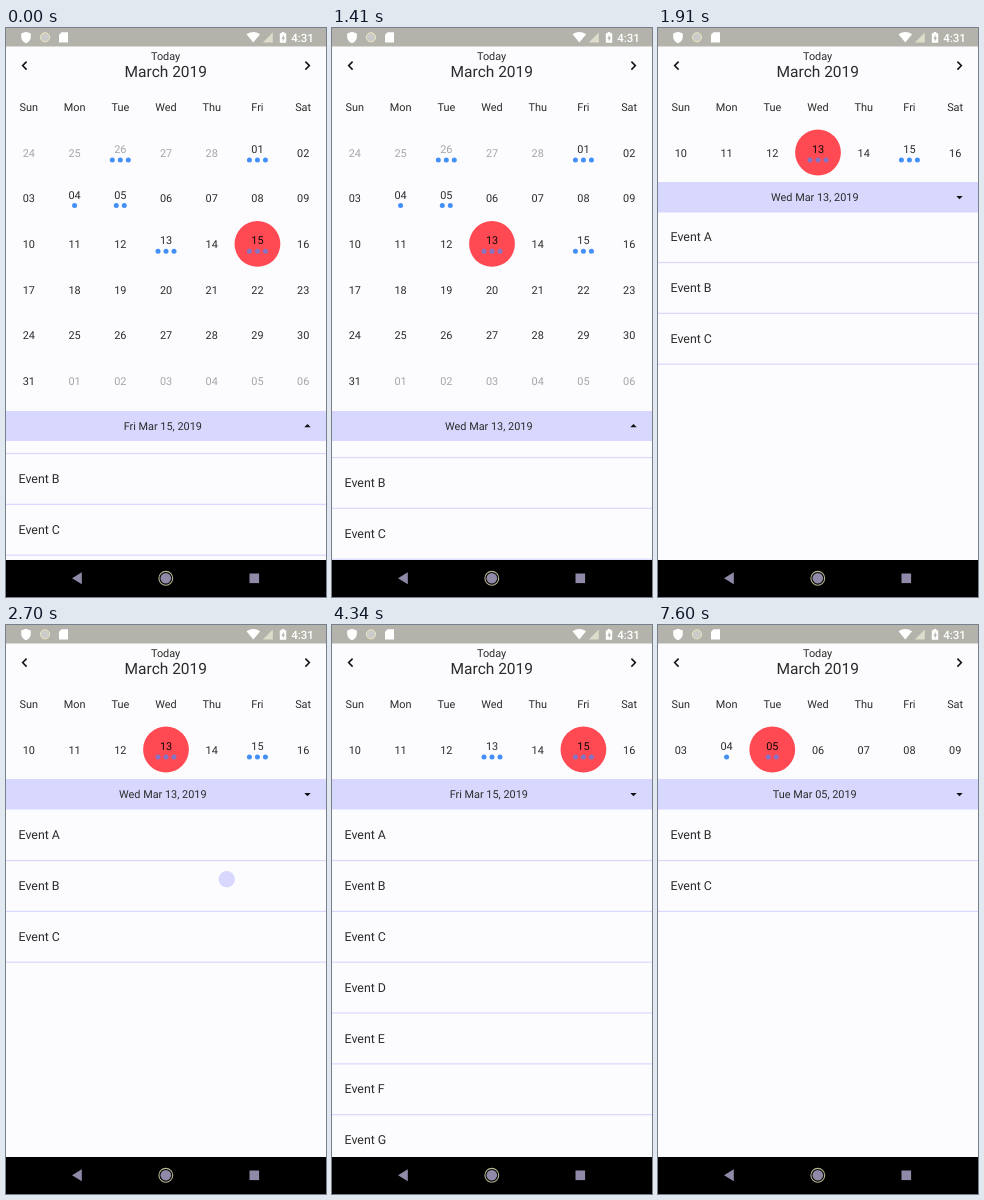
An HTML page for the animation above (8000 ms loop, 320 px wide and 569 px high).

```html
<!DOCTYPE html>
<html lang="en">
<head>
<meta charset="utf-8">
<title>Calendar</title>
<style>
html, body { margin: 0; width: 100%; height: 100%; overflow: hidden; background: #fcfcfe; }
svg { display: block; width: 320px; height: 569px; font: 10.9px Roboto, sans-serif; fill: #2b2b2b; text-rendering: geometricPrecision; }
.mid { text-anchor: middle; }
.faded { fill: #a6a6a8; }
.chosen { fill: #100808; }
.dot { fill: #448ff8; }
.dot.over { fill: #8874c4; }
.event { font-size: 12.4px; }
.tint { fill: #d8d8ff; }
.paper { fill: #fcfcfe; }

/* One loop is 8 s, so 1% is 80 ms. */
.a, .b, .c, .d, .e, .up, .down { visibility: hidden; animation: 8s step-end infinite; }
.a { animation-name: a; }
.b { animation-name: b; }
.c { animation-name: c; }
.d { animation-name: d; }
.e { animation-name: e; }
.up { animation-name: up; }
.down { animation-name: down; }
@keyframes a { 0% { visibility: visible } 6.25%, 100% { visibility: hidden } }
@keyframes b { 0% { visibility: hidden } 6.25% { visibility: visible } 53.25%, 100% { visibility: hidden } }
@keyframes c { 0% { visibility: hidden } 53.25% { visibility: visible } 75.75%, 100% { visibility: hidden } }
@keyframes d { 0% { visibility: hidden } 75.75% { visibility: visible } 92.375%, 100% { visibility: hidden } }
@keyframes e { 0% { visibility: hidden } 92.375%, 100% { visibility: visible } }
@keyframes up { 0% { visibility: visible } 17.96%, 100% { visibility: hidden } }
@keyframes down { 0% { visibility: hidden } 17.96%, 100% { visibility: visible } }

#month { animation: leave 8s linear infinite; }
#week { animation: enter 8s linear infinite; }
#sheet { animation: collapse 8s linear infinite; }
#list-a { transform: translateY(-38.5px); }
#list-b { animation: settle 8s linear infinite; }
@keyframes leave { 0%, 17.96% { opacity: 1 } 19.85%, 100% { opacity: 0 } }
@keyframes enter { 0%, 18.75% { opacity: 0 } 20.25% { opacity: .87 } 21%, 100% { opacity: 1 } }
@keyframes collapse {
  0% { transform: translateY(228.5px) }
  17.96% { transform: translateY(228.5px); animation-timing-function: cubic-bezier(.4, 0, .2, 1) }
  21.71%, 100% { transform: none }
}
@keyframes settle {
  0% { transform: translateY(-38.5px) }
  6.25% { transform: translateY(-38.5px); animation-timing-function: ease-out }
  9% { transform: translateY(-34.5px) }
  19.05% { transform: translateY(-34.5px); animation-timing-function: cubic-bezier(.4, 0, .7, .67) }
  20.25% { transform: translateY(-20px); animation-timing-function: cubic-bezier(.15, .52, .4, 1) }
  25.5%, 100% { transform: none }
}

#splash { transform-origin: 220.7px 254.3px; animation: splash 8s linear infinite; }
.glow { opacity: 0; animation: glow 8s ease-in-out infinite; }
@keyframes splash {
  0%, 33.74% { opacity: 0; transform: none }
  33.75%, 35.62% { opacity: 1; transform: none }
  38.5% { opacity: 0; transform: scale(2.5) }
  100% { opacity: 0; transform: none }
}
@keyframes glow { 0%, 35.6% { opacity: 0 } 38% { opacity: .35 } 43.87%, 100% { opacity: 0 } }
</style>
</head>
<body>
<svg viewBox="0 0 320 569">
  <clipPath id="tile"><rect y="235.8" width="320" height="50"/></clipPath>
  <rect class="paper" width="320" height="569"/>

  <g id="month"></g>
  <g id="week"></g>

  <g id="sheet">
    <rect class="paper" y="154" width="320" height="420"/>
    <g class="tint">
      <g clip-path="url(#tile)"><circle id="splash" cx="220.7" cy="254.3" r="8.2"/></g>
      <ellipse class="glow" cx="160" cy="184" rx="190" ry="15"/>
      <ellipse class="glow" cx="160" cy="532" rx="190" ry="15"/>
    </g>
    <g id="lists"></g>
    <rect class="tint" y="154" width="320" height="30.5"/>
    <g id="labels"></g>
    <path class="up" d="M298.3 170.8h6.4l-3.2-3.2z" fill="#111"/>
    <path class="down" d="M298.3 168h6.4l-3.2 3.2z" fill="#111"/>
  </g>

  <text class="mid" x="159.6" y="32.3">Today</text>
  <text class="mid" x="159.8" y="49.3" font-size="15.5">March 2019</text>
  <path d="M20.6 33.6l-4 4 4 4M299.4 33.6l4 4-4 4" fill="none" stroke="#111" stroke-width="1.5"/>

  <rect width="320" height="18.5" fill="#b3b3ab"/>
  <g fill="#fff">
    <path d="M20 3.8l4.8 1.8v3.4c0 3-2 5.2-4.8 6.2-2.8-1-4.8-3.2-4.8-6.2V5.600z"/>
    <circle cx="39" cy="9.3" r="4.6" fill="#cbcbc9" stroke="#ece6bc"/>
    <path d="M55.500 4.300H62v10.200h-9V6.800z"/>
    <path d="M240.500 6.300q6.800-4.800 13.600 0l-6.800 8.200z"/>
    <path d="M266.800 4.500v10h-10z" fill="#dedcca"/>
    <path d="M275.700 4h2.600v1.200h1.900v9.500h-6.400V5.200h1.900z"/>
    <path d="M277.600 6.700l-2.200 4h1.400v2.700l2.200-4h-1.400z" fill="#b3b3ab"/>
    <text class="mid" x="296.600" y="13.500" font-size="11.5" font-weight="500">4:31</text>
  </g>

  <rect y="532" width="320" height="37" fill="#000"/>
  <g fill="#908aa8">
    <path d="M66 550.300l9.800-6v12z"/>
    <circle cx="159.800" cy="550.300" r="5.300"/>
    <circle cx="159.800" cy="550.300" r="6.900" fill="none" stroke="#b9b694" stroke-width="1.100"/>
    <rect x="243.500" y="545.500" width="9.600" height="9.600"/>
  </g>
</svg>
<script>
const COL = 320 / 7, ROW = 45.72, TILE = 50.83;
const WEEKDAYS = ["Sun", "Mon", "Tue", "Wed", "Thu", "Fri", "Sat"];
// Days are counted from Sunday, February 24.
const marks = { 2: 3, 5: 3, 8: 1, 9: 2, 17: 3, 19: 3 };
const states = [
  { id: "a", day: 19, events: "ABCDEFGH" },
  { id: "b", day: 17, events: "ABC" },
  { id: "c", day: 19, events: "ABCDEFGH" },
  { id: "d", day: 12, events: "" },
  { id: "e", day: 9, events: "BC" }
];

const dateOf = n => new Date(2019, 1, 24 + n);
const colX = i => COL * (i + .5);
const text = (x, y, s, cls) => `<text class="${cls}" x="${x}" y="${y}">${s}</text>`;
const add = (id, html) => document.getElementById(id).insertAdjacentHTML("beforeend", html);

function dayCell(n, y, chosen) {
  const x = colX(n % 7), count = marks[n] || 0;
  const tone = chosen ? "chosen" : n < 5 || n > 35 ? "faded" : "";
  let out = chosen ? `<circle cx="${x}" cy="${y}" r="22.9" fill="#ff4a54"/>` : "";
  out += text(x, y + (count ? .4 : 4), String(dateOf(n).getDate()).padStart(2, "0"), "mid " + tone);
  for (let i = 0; i < count; i++)
    out += `<circle class="dot ${chosen ? "over" : ""}" cx="${x + 8 * (i - (count - 1) / 2)}" cy="${y + 7.4}" r="2.5"/>`;
  return out;
}

function days(state, first, count) {
  let out = "";
  for (let i = 0; i < count; i++)
    out += dayCell(first + i, 124.500 + ROW * Math.floor(i / 7), first + i === state.day);
  return `<g class="${state.id}">${out}</g>`;
}

function eventList({ id, events }) {
  const tiles = [...events].map((name, i) => {
    const top = 184.5 + TILE * i;
    return text(12.5, top + 29.7, "Event " + name, "event") +
      `<rect class="tint" y="${top + TILE - .4}" width="320" height="1.2"/>`;
  });
  return `<g class="${id}"><g id="list-${id}">${tiles.join("")}</g></g>`;
}

for (const view of ["month", "week"])
  add(view, WEEKDAYS.map((name, i) => text(colX(i), 83, name, "mid")).join(""));

for (const state of states) {
  if ("ab".includes(state.id)) add("month", days(state, 0, 42));
  if (state.id !== "a") add("week", days(state, state.day - state.day % 7, 7));
  add("lists", eventList(state));
  const label = dateOf(state.day).toDateString().replace(/ (\d{4})$/, ", $1");
  add("labels", text(156.8, 173.3, label, "mid " + state.id));
}
</script>
</body>
</html>
```
